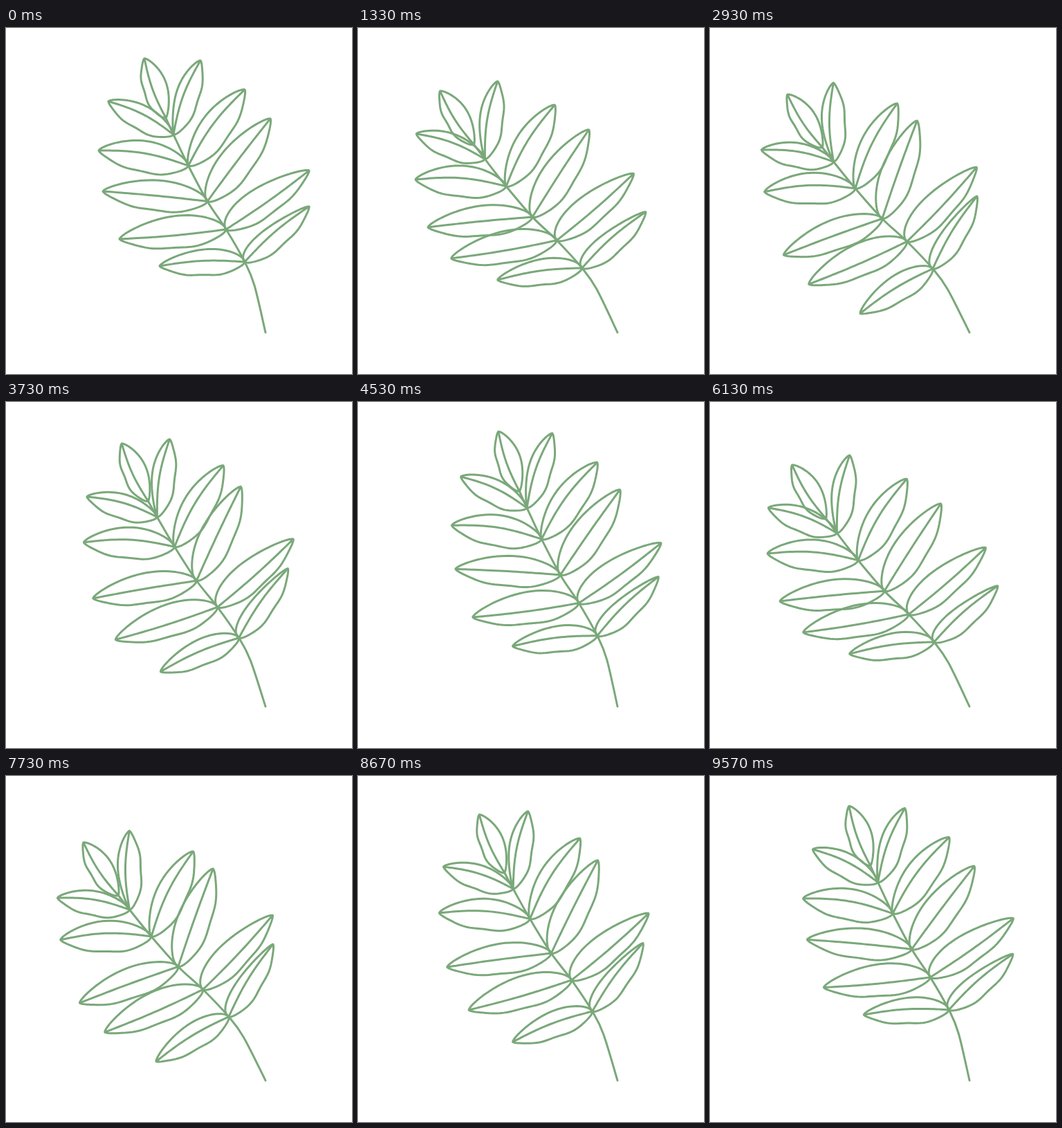
Write an HTML page with a canvas that moves like this. It is 500 px wide and 500 px high and loops after 9.61 s.

```html
<!DOCTYPE html>
<html lang="en">
<head>
<meta charset="utf-8">
<title>Swaying leaf</title>
<style>
  html, body { margin: 0; width: 100%; height: 100%; overflow: hidden; background: #fff; }
  canvas { display: block; width: 100vw; height: 100vh; }
</style>
</head>
<body>
<canvas id="stage" width="500" height="500"></canvas>
<script>
const ctx = document.getElementById('stage').getContext('2d');
const { PI, sin, cos, abs, floor, hypot } = Math;
const RAD = PI / 180;
const LOOP = 9610, PERIOD = 4800, STEP = 40, HOLD = 70;
const COLOR = '#7aa87a', LINE = 3;
const SWAY = 18.2, SWAY_LEAD = 225;

const root = { x: 375, y: 440 };
const bend = { x: 359, y: 372 };

// Joints from the bottom up; bow lifts the midribs of the leaves that grow there.
const joints = [
  { x: 345, y: 338, bow: 4.5 },
  { x: 318, y: 291, bow: -2 },
  { x: 291, y: 250.5, bow: 1 },
  { x: 263.5, y: 199, bow: 7 },
  { x: 242, y: 154, bow: 6 },
  { x: 231, y: 130, bow: -4 }
];

// Over and under are the half widths; swing and lead are in degrees.
const leaves = [
  { level: 1, tip: [438, 258], over: 16.5, under: 18, swing: 10.5, lead: 83 },
  { level: 2, tip: [438, 206], over: 24, under: 20, swing: 4.7, lead: 57 },
  { level: 3, tip: [382, 131], over: 25, under: 23.5, swing: 7.7, lead: 87 },
  { level: 4, tip: [345, 89], over: 23, under: 22, swing: 4.5, lead: 48 },
  { level: 5, tip: [281, 47], over: 17, under: 17.5, swing: 4.8, lead: 117 },
  { level: 1, tip: [222, 344], over: 21, under: 17, swing: 13, lead: 109 },
  { level: 2, tip: [164, 305], over: 26, under: 21, swing: 7.9, lead: 89 },
  { level: 3, tip: [140, 236], over: 23.5, under: 21, swing: 8, lead: 124 },
  { level: 4, tip: [134, 177], over: 25, under: 20.5, swing: 4.9, lead: 59 },
  { level: 5, tip: [148, 106], over: 18.5, under: 17.5, swing: 6, lead: 92 },
  { level: 6, tip: [200, 44], over: 17.5, under: 17.5, swing: 0, lead: 0 }
];

// Blunt arch from 0 to 0; a smaller skew moves the crest towards the joint.
const arch = (s, skew) => abs(sin(PI * s ** skew)) ** 0.7;
const ripple = s => -1.2 * cos(4 * PI * s) * sin(PI * s);

function leafPath({ level, tip, over, under }) {
  const { x, y, bow } = joints[level - 1];
  const dx = tip[0] - x, dy = tip[1] - y;
  const side = dx > 0 ? 1 : -1;
  const length = hypot(dx, dy) * side;
  const skew = dx > 0 ? 0.6 + 0.025 * level ** 2 : 0.8 + 0.008 * level ** 2;
  const path = new Path2D();

  function edge(offset) {
    path.moveTo(x, y);
    for (let i = 1; i <= 40; i++) {
      const s = (1 - cos(PI * i / 40)) / 2;
      const lift = offset(s) / length;
      path.lineTo(x + dx * s + dy * lift, y + dy * s - dx * lift);
    }
  }

  edge(s => over * arch(s, skew));
  edge(s => -under * arch(s, 0.87) - ripple(s));
  edge(s => bow * sin(PI * s));
  return path;
}

// Smooth curve through all points
function spline(points) {
  const path = new Path2D();
  path.moveTo(points[0].x, points[0].y);
  for (let i = 0; i < points.length - 1; i++) {
    const b = points[i], c = points[i + 1];
    const a = points[i - 1] || b, d = points[i + 2] || c;
    path.bezierCurveTo(
      b.x + (c.x - a.x) / 6, b.y + (c.y - a.y) / 6,
      c.x - (d.x - b.x) / 6, c.y - (d.y - b.y) / 6,
      c.x, c.y);
  }
  return path;
}

const stem = spline([root, bend, ...joints]);
leaves.forEach(leaf => { leaf.path = leafPath(leaf); });

// The whole twig eases back and forth about its root.
function sway(ms) {
  const u = ((ms + SWAY_LEAD) % PERIOD) / (PERIOD / 2);
  const k = u > 1 ? 2 - u : u;
  return SWAY * k * k * (3 - 2 * k);
}

const swingAt = ({ swing, lead }, ms) => swing * cos((ms / PERIOD * 360 + lead) * RAD);

// Counter-clockwise turn about a point
function turn({ x, y }, degrees) {
  ctx.translate(x, y);
  ctx.rotate(-degrees * RAD);
  ctx.translate(-x, -y);
}

function draw(ms) {
  ctx.setTransform(1, 0, 0, 1, 0, 0);
  ctx.fillStyle = '#fff';
  ctx.fillRect(0, 0, 500, 500);
  ctx.strokeStyle = COLOR;
  ctx.lineWidth = LINE;
  ctx.lineCap = ctx.lineJoin = 'round';
  turn(root, sway(ms) - sway(0));
  ctx.stroke(stem);
  for (const leaf of leaves) {
    ctx.save();
    turn(joints[leaf.level - 1], swingAt(leaf, ms) - swingAt(leaf, 0));
    ctx.stroke(leaf.path);
    ctx.restore();
  }
}

function tick() {
  const t = performance.now() % LOOP;
  draw(t < HOLD ? 0 : floor((t - 10) / STEP) * STEP);
  requestAnimationFrame(tick);
}
tick();
</script>
</body>
</html>
```
